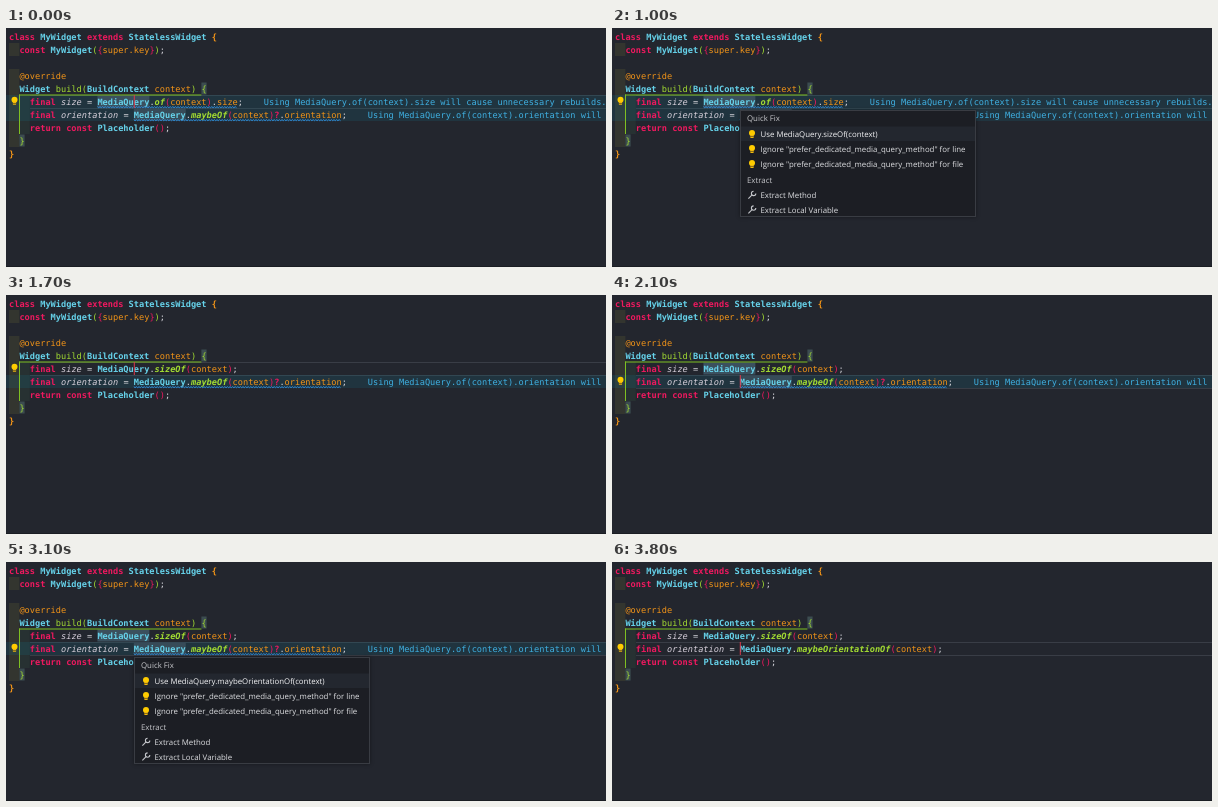
Recreate the animation shown at these times as an HTML page with a canvas. Size 600 by 239 pixels, loop 3900 ms.

```html
<!DOCTYPE html>
<html lang="en">
<head>
<meta charset="utf-8">
<title>Quick fix demo</title>
<style>
html, body { margin: 0; width: 100%; height: 100%; overflow: hidden; background: #23262e; }
canvas { display: block; }
</style>
</head>
<body>
<canvas id="stage" width="600" height="239"></canvas>
<script>
const ctx = document.getElementById('stage').getContext('2d');
const LOOP = 3900, COL = 5.2, ROW = 13, LEFT = 3, TOP = 2;
const SIZE_ROW = 5, ORIENT_ROW = 6, CURSOR_COL = 24;
const MONO = '8.637px "DejaVu Sans Mono", "Noto Sans Mono", monospace';
const SANS = '500 7.85px "Open Sans", "Noto Sans", sans-serif';

// Token kinds: [colour, font prefix]
const STYLE = {
  key: ['#ee195f', 'bold'],
  type: ['#66d2ea', 'bold'],
  func: ['#a3dc32', 'normal'],
  call: ['#a3dc32', 'italic bold'],
  param: ['#f29418', 'normal'],
  name: ['#d8d1dc', 'italic'],
  text: ['#d8d8de', 'normal'],
  b1: ['#f29418', 'bold'],
  b2: ['#a3dc32', 'normal'],
  b3: ['#ee195f', 'normal'],
  hint: ['#3fb0e2', 'normal']
};

const colX = col => LEFT + col * COL;
const rowY = row => TOP + row * ROW;

function rect(x, y, w, h, color) {
  ctx.fillStyle = color;
  ctx.fillRect(x, y, w, h);
}

// Tokens alternate kind and text.
function code(row, col, ...tokens) {
  for (let i = 0; i < tokens.length; i += 2) {
    const [color, prefix] = STYLE[tokens[i]];
    const text = tokens[i + 1];
    ctx.font = prefix + ' ' + MONO;
    ctx.fillStyle = color;
    ctx.fillText(text, colX(col), rowY(row) + 9.7);
    col += text.length;
  }
}

function squiggle(row, from, to) {
  const y = rowY(row) + 12.2;
  ctx.beginPath();
  for (let x = colX(from), i = 0; x <= colX(to); x += 1.3, i++) {
    ctx.lineTo(x, y + (i % 2 ? 0.5 : -0.5));
  }
  ctx.strokeStyle = '#3190df';
  ctx.lineWidth = 1;
  ctx.stroke();
}

function bulb(x, y) {
  ctx.fillStyle = '#ffcc00';
  ctx.beginPath();
  ctx.arc(x, y - 1, 3, 0, Math.PI * 2);
  ctx.fill();
  rect(x - 1.6, y + 1, 3.2, 3, '#f2b90c');
  rect(x - 1.6, y + 2.3, 3.2, 0.6, '#4a4020');
}

function wrench(x, y) {
  ctx.strokeStyle = '#c4c6cb';
  ctx.lineWidth = 1.1;
  ctx.beginPath();
  ctx.moveTo(x - 3.6, y + 3.6);
  ctx.lineTo(x + 0.3, y - 0.3);
  ctx.stroke();
  ctx.beginPath();
  ctx.arc(x + 1.6, y - 1.6, 2.2, 0, Math.PI * 1.5);
  ctx.stroke();
}

function label(text, x, y, color) {
  ctx.font = SANS;
  ctx.fillStyle = color;
  ctx.fillText(text, x, y + 2.9);
}

function menu(top, fix) {
  ctx.save();
  ctx.shadowColor = 'rgba(0,0,0,.4)';
  ctx.shadowBlur = 4;
  rect(128, top, 236, 107, '#1c1e24');
  ctx.restore();
  ctx.strokeStyle = '#393c43';
  ctx.lineWidth = 1;
  ctx.strokeRect(128.5, top + 0.5, 235, 106);
  rect(129, top + 16.5, 234, 14.5, '#23272f');
  label('Quick Fix', 135, top + 8.5, '#c6c7cb');
  const ignore = 'Ignore "prefer_dedicated_media_query_method" for ';
  [fix, ignore + 'line', ignore + 'file'].forEach((text, i) => {
    const y = top + 24 + i * 15;
    bulb(140, y);
    label(text, 148.5, y, i ? '#dedfe2' : '#f2f2f4');
  });
  label('Extract', 135, top + 70, '#c6c7cb');
  ['Extract Method', 'Extract Local Variable'].forEach((text, i) => {
    const y = top + 85 + i * 14.7;
    wrench(140, y);
    label(text, 148.5, y, '#dedfe2');
  });
}

function indentGuides() {
  for (const row of [1, 3, 4, 5, 6, 7, 8]) {
    rect(LEFT, rowY(row), 2 * COL, ROW, 'rgba(255,255,64,.07)');
  }
  for (const row of [5, 6, 7]) {
    rect(colX(2), rowY(row), 2 * COL, ROW, 'rgba(127,255,127,.05)');
  }
}

function bracketGuides() {
  rect(colX(37), rowY(4) + 0.5, COL, 12, '#3c4c50');
  rect(colX(2), rowY(8) + 0.5, COL, 12, '#3c4c50');
  rect(13, 66.5, colX(37) - 13, 1, '#7fc022');
  rect(13, 66.5, 1, 39.5, '#7fc022');
}

function draw(t) {
  const sizeFixed = t >= 1500;
  const orientFixed = t >= 3400;
  const onOrient = t >= 1900;
  const firstMenu = t >= 300 && !sizeFixed;
  const secondMenu = t >= 2300 && !orientFixed;
  const cursorOn = t < 400 || (sizeFixed && t < 2500) || orientFixed;
  const highlight = !sizeFixed || (onOrient && !orientFixed);
  const activeRow = onOrient ? ORIENT_ROW : SIZE_ROW;
  const hintShade = 'rgba(20,110,128,.2)';

  rect(0, 0, 600, 239, '#23262e');
  rect(0, 238, 600, 1, '#1a1d23');
  indentGuides();
  rect(24, rowY(activeRow), 576, 1, '#393d46');
  rect(24, rowY(activeRow + 1), 576, 1, '#393d46');
  if (!sizeFixed) rect(0, rowY(SIZE_ROW), 600, ROW, hintShade);
  if (!orientFixed) rect(0, rowY(ORIENT_ROW), 600, ROW, hintShade);
  if (highlight) {
    rect(colX(17), rowY(SIZE_ROW) + 0.5, 10 * COL, 12, '#3b505e');
    rect(colX(24), rowY(ORIENT_ROW) + 0.5, 10 * COL, 12, '#374b58');
  }
  bracketGuides();

  code(0, 0, 'key', 'class ', 'type', 'MyWidget ', 'key', 'extends ', 'type', 'StatelessWidget ', 'b1', '{');
  code(1, 2, 'key', 'const ', 'type', 'MyWidget', 'b2', '(', 'b3', '{', 'param', 'super.key', 'b3', '}', 'b2', ')', 'text', ';');
  code(3, 2, 'param', '@override');
  code(4, 2, 'type', 'Widget ', 'func', 'build', 'b2', '(', 'type', 'BuildContext ', 'param', 'context', 'b2', ') {');

  const context = ['b3', '(', 'param', 'context', 'b3', ')'];
  const query = ['text', '= ', 'type', 'MediaQuery', 'text', '.'];
  const sizeLine = ['key', 'final ', 'name', 'size ', ...query];
  const orientLine = ['key', 'final ', 'name', 'orientation ', ...query];
  if (sizeFixed) {
    code(SIZE_ROW, 4, ...sizeLine, 'call', 'sizeOf', ...context, 'text', ';');
  } else {
    squiggle(SIZE_ROW, 17, 44);
    code(SIZE_ROW, 4, ...sizeLine, 'call', 'of', ...context, 'text', '.', 'param', 'size', 'text', ';');
    code(SIZE_ROW, 49, 'hint', 'Using MediaQuery.of(context).size will cause unnecessary rebuilds.');
  }
  if (orientFixed) {
    code(ORIENT_ROW, 4, ...orientLine, 'call', 'maybeOrientationOf', ...context, 'text', ';');
  } else {
    squiggle(ORIENT_ROW, 24, 64);
    code(ORIENT_ROW, 4, ...orientLine, 'call', 'maybeOf', ...context, 'key', '?', 'text', '.', 'param', 'orientation', 'text', ';');
    code(ORIENT_ROW, 69, 'hint', 'Using MediaQuery.of(context).orientation will');
  }
  code(7, 4, 'key', 'return const ', 'type', 'Placeholder', 'b3', '()', 'text', ';');
  code(8, 2, 'b2', '}');
  code(9, 0, 'b1', '}');

  bulb(8.5, rowY(activeRow) + 5.7);
  if (cursorOn) rect(colX(CURSOR_COL), rowY(activeRow), 1, ROW, '#d93a4c');
  if (firstMenu) menu(82, 'Use MediaQuery.sizeOf(context)');
  if (secondMenu) menu(95, 'Use MediaQuery.maybeOrientationOf(context)');
}

ctx.textRendering = 'geometricPrecision';

function tick() {
  draw(performance.now() % LOOP);
  requestAnimationFrame(tick);
}
tick();
</script>
</body>
</html>
```
